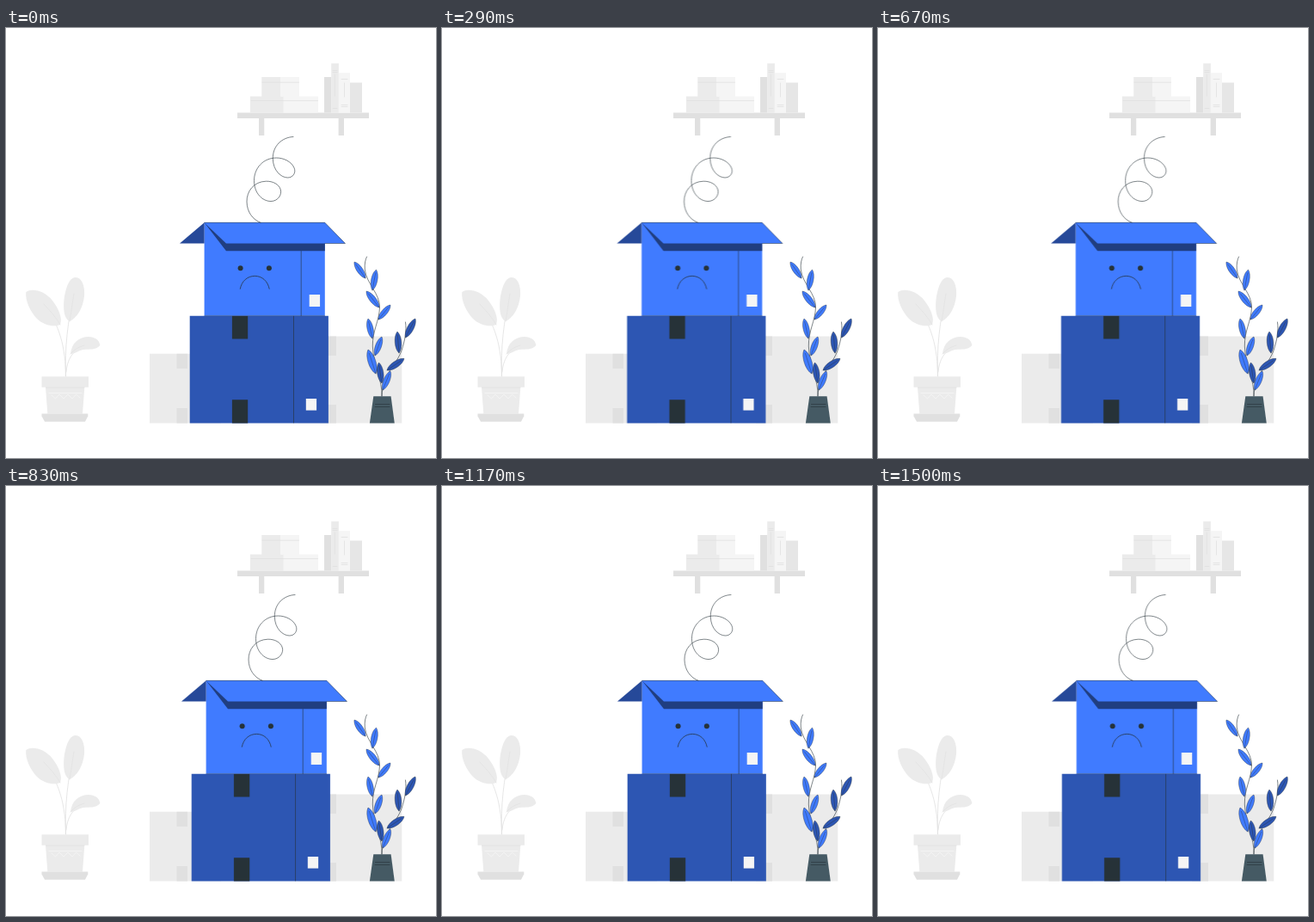
Recreate the animation shown at these times as an HTML page. Size 500 px wide and 500 px high, loop 1540 ms.

```html
<!DOCTYPE html>
<html lang="en">
<head>
<meta charset="utf-8">
<title>Sad box</title>
<style>
html, body { margin: 0; width: 100%; height: 100%; overflow: hidden; background: #fff; }
svg { display: block; width: 100vw; height: 100vh; }
.line { fill: none; stroke: #263238; stroke-width: .6; stroke-linecap: round; stroke-linejoin: round; }
.soft { fill: none; stroke: #e0e0e0; stroke-width: .8; stroke-linecap: round; }
.g1 { fill: #f5f5f5; }
.g2 { fill: #ebebeb; }
.g3 { fill: #e0e0e0; }
.blue { fill: #407bff; }
.ink { fill: #263238; }
</style>
</head>
<body>
<svg viewBox="0 0 500 500">
  <g id="shelf">
    <path class="g3" d="M269 98.5H422V105H269ZM294 105H300.3V125H294ZM386.6 105H393V125H386.6Z"/>
    <path class="g2" d="M284 79.5H323V98.5H284ZM297.3 57H319.5V79.5H297.3Z"/>
    <path class="g1" d="M322.5 79.5H363V98.5H322.5ZM319.5 57H341V79.5H319.5Z"/>
    <path class="soft" d="M298 63.2H340.5M285 84.6H362.5"/>
    <path class="g3" d="M370 57H378.3V98.5H370Z"/>
    <path class="g2" d="M378.2 41.2H386.9V98.5H378.2Z"/>
    <path class="g1" d="M386.8 52.2H400V98.5H386.8Z"/>
    <path fill="#e6e6e6" d="M400 63.5H414V98.5H400Z"/>
    <path class="soft" d="M380 49.5H385M380 51.5H385M382.3 54V79M380 93.5H385M390 59.5H397M393.5 64V80M390 89.5H397M390 91.5H397"/>
  </g>

  <g id="houseplant">
    <path class="soft" d="M69.5 405C69.5 372 62 344 44 321M69.5 405C68 372 72 340 79 309M70 400C71 386 77 375 91 369"/>
    <path class="g2" d="M23.3 307C31 302 45 306 54 317C61 326 66 337 63 345C56 348 44 346 36 338C28 330 22 316 23.3 307Z"/>
    <path class="g2" d="M80 290C88 289 92 300 91 312C89.500 325 83 337 74 341C67 338 66 325 68 312C70 300 74 291 80 290Z"/>
    <path class="g2" d="M75 379C76 367 84 359.500 95 359C103 358.700 109 363 109.300 369C104 375 97 373 90 374C84 375 80 379 75 379Z"/>
    <path class="soft" style="stroke:#e3e3e3" d="M63 345C58 336 52 330 44 321M74 341C76 331 77 320 79 309M75 379C79 374 84 371 91 369"/>
    <path class="g2" d="M41.500 405.200H96V417.700H41.500ZM46 417.700H91.300L89 448.500H48.300Z"/>
    <path class="soft" d="M46.500 418H91"/>
    <path class="soft" style="stroke:#f5f5f5" d="M50 424.500H88M53 427L57.500 431L62 426L67 431L72 426L77 431L81.500 426L86 430"/>
    <path class="g3" d="M41.500 448.500H95.300V451.300L92 457.700H45L41.500 451.300Z"/>
  </g>

  <g id="backBoxes">
    <path class="g2" d="M167 378.800H250V459.500H167ZM340 358.500H460.300V459.500H340Z"/>
    <path class="g3" d="M198.500 378.800H211V396H198.500ZM198.500 442H211V459.500H198.500ZM365 358.500H384V381H365ZM365 438H384V459.500H365Z"/>
  </g>

  <g id="boxes">
    <path fill="#2d56b3" d="M213.700 334.700H374.900V459.400H213.700Z"/>
    <path class="ink" d="M262.900 334.700H281.200V361.600H262.900ZM262.900 432.200H281.200V459.400H262.900Z"/>
    <path class="line" d="M334.500 335V459"/>
    <path class="g1" d="M348.800 431H361.100V444.600H348.800Z"/>

    <path class="blue" d="M230.600 226.200H370.800V334.700H230.600Z"/>
    <path class="line" d="M343.200 259V334.500"/>
    <path class="line" style="stroke-width:.4" d="M231 334.600H370.500"/>
    <path class="g1" d="M352.700 310H365.100V324H352.700Z"/>
    <path fill="#203e80" d="M230.600 226.200L256 259.300H370.800V250L256 248Z"/>
    <path fill="#264999" d="M230.600 226.200L202 250.600H230.600Z"/>
    <path class="blue" d="M230.600 226.200H370.800L394.600 250.500H256Z"/>
    <path class="line" style="stroke-width:.5" d="M230.600 226.300H370.800L394.400 250.500H371"/>

    <circle class="ink" cx="272.600" cy="279.300" r="3"/>
    <circle class="ink" cx="305.900" cy="279.300" r="3"/>
    <path class="line" style="stroke-width:.75" d="M272.300 303.300C274 294 281 288.400 289.300 288.400S304.300 294 306.200 303.300"/>
    <path class="line" d="M334 126.500C321 127 310 137 310.300 152C310.600 166 320 174 327.500 174C334 174 337.500 168 335 162.500C332 155.500 323 151 314.500 151C299 151 288.500 163 288.500 177.500C288.500 192 298 201.500 308 201.500C316 201.500 321 194 319.300 188C317.500 181.500 310 178 302.500 178.200C288 178.500 279.800 190 280 202C280.200 214 287 223 296 226.300"/>
  </g>

  <g id="vine">
    <path class="line" d="M437 428C438 410 427 392 426.300 370C426 352 434 341 434.500 325C435 309 419 297 417.300 281C416.700 274 418 269 419.500 266M437 428C438 402 454 392 460 375C464 363 466 352 464.500 342"/>
    <g id="leaves"></g>
    <path fill="#455a64" d="M427.300 428.300H447.600L451.800 459.400H422.900Z"/>
    <path class="line" d="M429.500 437.500H446M429 440.500H446"/>
  </g>
</svg>
<script>
const $ = id => document.getElementById(id);

// tip x, tip y, base x, base y
const light = [
  [405, 272, 418, 291], [430.500, 281, 426, 305], [419, 306, 434, 325],
  [447, 322, 433, 339], [421, 338, 426, 361], [437, 359, 429, 381],
  [421, 374, 430, 402], [447, 399, 438, 421]
];
const dark = [
  [455, 353, 457, 378], [476, 338, 464.500, 360],
  [463, 384.500, 443, 398], [433.500, 389, 437, 413]
];

function leaf([x, y, bx, by], fill) {
  const dx = bx - x, dy = by - y;
  const side = k => {
    const nx = -dy * k, ny = dx * k;
    return [x + dx * .2 + nx, y + dy * .2 + ny, x + dx * .8 + nx, y + dy * .8 + ny];
  };
  const a = side(.2), b = side(-.2);
  return `<path d="M${x} ${y}C${a} ${bx} ${by}C${[b[2], b[3], b[0], b[1]]} ${x} ${y}Z"
    fill="${fill}" stroke="#263238" stroke-width=".4"/>
    <path class="line" style="stroke-width:.4" d="M${x + dx * .15} ${y + dy * .15}L${bx} ${by}"/>`;
}
$('leaves').innerHTML =
  light.map(l => leaf(l, '#407bff')).join('') + dark.map(l => leaf(l, '#2d56b3')).join('');

// Shake: offsets at every tenth of 1.5 s, sampled at 24 steps per second
const shake = [0, -1, 2, -4, 4, -4, 4, -4, 2, -1, 0];
const loop = 1540, steps = 37, lead = 26;

function shift(t) {
  const p = Math.min(t + lead, 1500) / 150, i = Math.min(Math.floor(p), 9);
  return shake[i] + (shake[i + 1] - shake[i]) * (p - i);
}

const rest = shift(0);
const poses = Array.from({ length: steps }, (_, k) => {
  const t = k * 1000 / 24;
  return {
    offset: Math.round(t / 10) * 10 / loop,
    transform: `translateX(${(shift(t) - rest).toFixed(3)}px)`,
    easing: 'step-end'
  };
});
poses.push({ ...poses[steps - 1], offset: 1 });
$('boxes').animate(poses, { duration: loop, iterations: Infinity });
</script>
</body>
</html>
```
